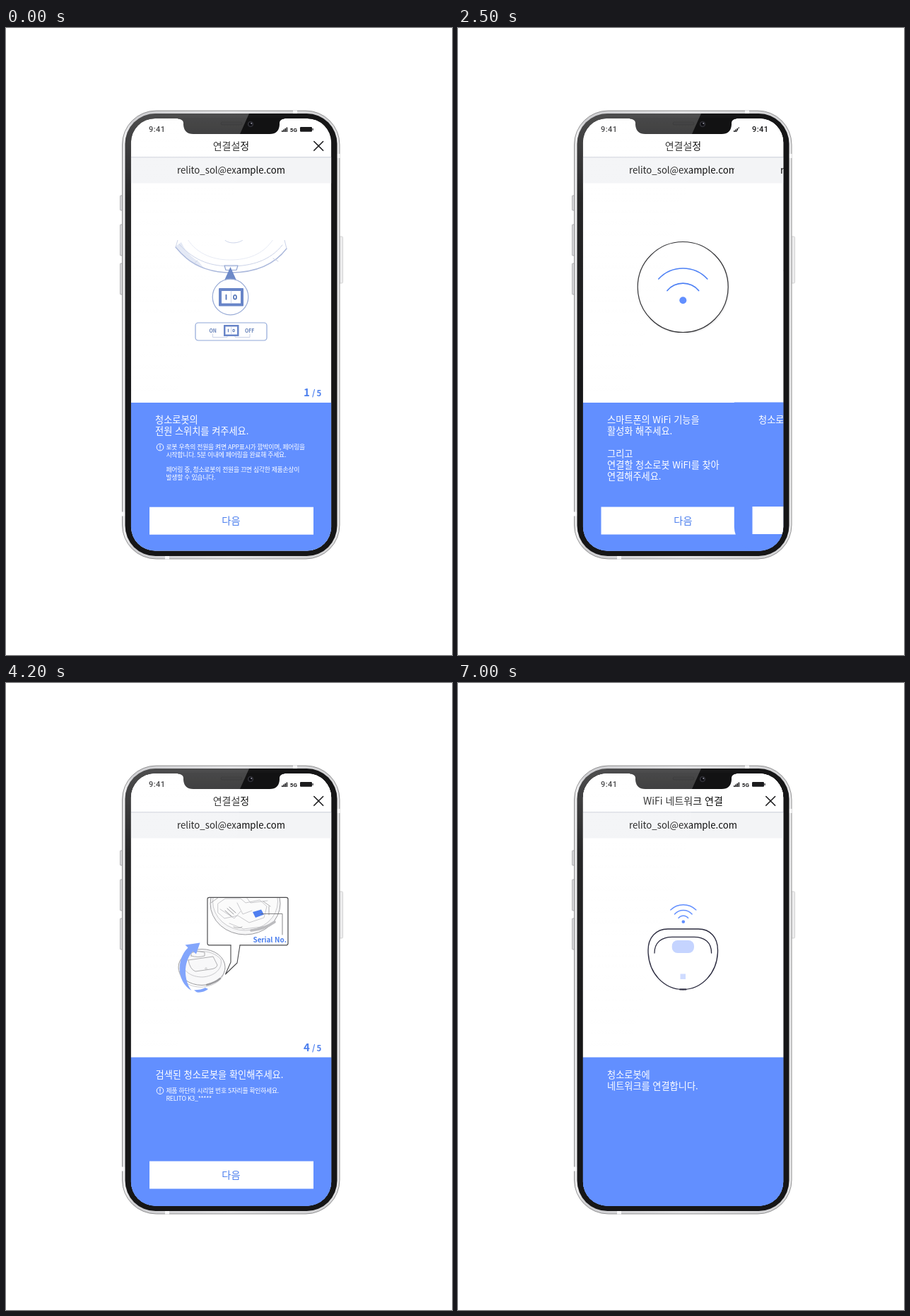
An HTML page for the animation above (8 s loop, 631 by 887 pixels).

```html
<!DOCTYPE html>
<html lang="ko">
<head>
<meta charset="utf-8">
<title>연결설정</title>
<style>
  html, body { margin: 0; width: 100%; height: 100%; overflow: hidden; background: #fff; }
  svg { display: block; width: 631px; height: 887px; }
  text { font-family: "Noto Sans CJK KR", "Noto Sans KR", "Noto Sans", sans-serif; white-space: pre; }
  .ui { font-family: Roboto, sans-serif; }
  .line { fill: none; stroke-linecap: round; stroke-linejoin: round; }
</style>
</head>
<body>
<svg viewBox="0 0 631 887">
  <defs>
    <clipPath id="screen"><rect x="176.8" y="128" width="283.5" height="611.7" rx="34"/></clipPath>
    <clipPath id="bezel"><rect x="168.5" y="121" width="300" height="626" rx="43"/></clipPath>
    <clipPath id="inset"><rect x="286" y="304" width="112" height="66"/></clipPath>
    <clipPath id="below"><rect x="235" y="300" width="166" height="60"/></clipPath>
    <linearGradient id="metal" x2="1" y2="0">
      <stop offset="0" stop-color="#d2d2d4"/><stop offset=".01" stop-color="#f2f2f3"/>
      <stop offset=".05" stop-color="#cdcdd0"/><stop offset=".5" stop-color="#e2e2e4"/>
      <stop offset=".95" stop-color="#d2d2d4"/><stop offset="1" stop-color="#ececed"/>
    </linearGradient>
    <linearGradient id="gloss" x2="0" y2="1">
      <stop offset="0" stop-color="#fff" stop-opacity=".24"/>
      <stop offset=".12" stop-color="#fff" stop-opacity=".17"/>
      <stop offset=".3" stop-color="#fff" stop-opacity=".07"/>
      <stop offset="1" stop-color="#fff" stop-opacity="0"/>
    </linearGradient>
    <linearGradient id="lens" x2="1" y2=".25">
      <stop offset=".5" stop-color="#cddaff"/><stop offset=".62" stop-color="#bccdff"/>
    </linearGradient>
  </defs>

  <g id="body">
    <g fill="#dadadc" stroke="#8a8a8d" stroke-width=".6">
      <rect x="161.5" y="237" width="4" height="21" rx="1"/>
      <rect x="161.5" y="278" width="4" height="44" rx="1"/>
      <rect x="161.5" y="333" width="4" height="44" rx="1"/>
      <rect x="470" y="295" width="6.5" height="66" rx="1.5" fill="#ededee" stroke="#bcbcbe"/>
    </g>
    <rect x="164.5" y="117" width="307.5" height="634" rx="48" fill="url(#metal)" stroke="#88888a" stroke-width=".9"/>
    <g fill="#f8f8f9">
      <rect x="406" y="116.5" width="6" height="5"/><rect x="467.5" y="178" width="5" height="6"/>
      <rect x="164" y="684.5" width="5" height="6"/><rect x="225" y="746" width="6" height="5.5"/>
    </g>
    <rect x="168.5" y="121" width="300" height="626" rx="43" fill="#161617"/>
  </g>

  <g id="pages" clip-path="url(#screen)"></g>

  <path fill="#121213" d="M243 127H394V128.5Q387.5 129 387 134V137Q386 150 373 150H265Q252 150 251 137V134Q250.5 129 243 128.5Z"/>
  <rect x="304" y="133" width="30" height="4" rx="2" fill="#101011" stroke="#070708" stroke-width=".7"/>
  <circle cx="346" cy="136" r="4.3" fill="#2d2d33"/>
  <circle cx="346" cy="136" r="2.4" fill="#08080c"/>
  <circle cx="347.2" cy="135" r="1" fill="#9a9aa6"/>
  <path clip-path="url(#bezel)" fill="url(#gloss)" d="M168 121H344L331 150L329 210L240 521H168Z"/>
</svg>

<script>
const BLUE = '#628fff', INK = '#1b1b1d', KEY = '#4c7fee';
const LOOP = 8000, FIRST = 1100, EVERY = 1400, STEP = 100;
const MAIL = 'relito_sol@example.com';

const attrs = o => Object.entries(o).map(([k, v]) => ` ${k}="${v}"`).join('');
const text = (x, y, size, fill, str, more = {}) =>
  `<text${attrs({ x, y, 'font-size': size, fill, ...more })}>${str}</text>`;
const mid = (y, size, fill, str, more = {}) =>
  text(318.4, y, size, fill, str, { 'text-anchor': 'middle', ...more });
const line = (d, stroke, w = 1, more = {}) =>
  `<path class="line"${attrs({ d, stroke, 'stroke-width': w, ...more })}/>`;
const shape = (d, fill) => `<path${attrs({ d, fill })}/>`;
const rect = (x, y, width, height, fill, more = {}) =>
  `<rect${attrs({ x, y, width, height, fill, ...more })}/>`;
const dot = (cx, cy, r, fill, more = {}) => `<circle${attrs({ cx, cy, r, fill, ...more })}/>`;
const oval = (cx, cy, rx, ry, fill, stroke, more = {}) =>
  `<ellipse${attrs({ cx, cy, rx, ry, fill, stroke, ...more })}/>`;

// Shallow arch of half-width h rising to s above y
const arch = (cx, y, h, s, stroke, w) => {
  const r = (h * h + s * s) / (2 * s);
  return line(`M${cx - h} ${y}A${r} ${r} 0 0 1 ${cx + h} ${y}`, stroke, w);
};

const lines = (rows, x = 211, y = 559.2, size = 13.2, gap = 15.9, more = {}) =>
  rows.map((row, i) => row && text(x, y + i * gap, size, '#fff', row, more)).join('');

const note = (rows, y) =>
  dot(218, y - 3.2, 4.8, 'none', { stroke: '#fff' }) +
  line(`M218 ${y - 6}v3.4m0 2v.2`, '#fff', 1.1) +
  lines(rows, 226.5, y, 8.9, 10.7, { 'letter-spacing': -.29 });

const header = title =>
  rect(176, 128, 285, 612, '#fff') +
  text(202, 147.3, 11, INK, '9:41', { class: 'ui', 'font-weight': 500, 'letter-spacing': .45 }) +
  [0, 1, 2, 3].map(i => rect(390 + i * 2.2, 145 - i * 1.5, 1.6, 2 + i * 1.5, INK)).join('') +
  text(401.8, 146.6, 8, INK, '5G', { class: 'ui', 'font-weight': 700 }) +
  rect(416, 140, 17, 6.8, INK, { rx: 1.2 }) + rect(433.5, 142, 1.2, 2.8, INK) +
  mid(172.3, 14, '#111', title) +
  line('M435.8 160.5l12.8 12.8m0-12.8l-12.8 12.8', INK, 1.6) +
  rect(176, 183, 285, 36.5, '#f3f4f6') + rect(176, 182.2, 285, 1.2, '#cfd3dc') +
  mid(206.3, 13.2, '#0c0c0c', MAIL);

const counter = n =>
  text(421, 521.3, 15, KEY, n, { 'font-weight': 700 }) +
  text(433, 521.3, 11.5, KEY, '/', { 'font-weight': 700 }) +
  text(439.5, 521.3, 11.5, KEY, '5', { 'font-weight': 700 });

const panel = (y = 529.5) => rect(176, y, 285, 740 - y, BLUE);
const button = (label, y = 677, fill = KEY, x = 202.5) =>
  rect(x, y, 232, 39, '#fff') + mid(y + 24.4, 14.2, fill, label);

// Rocker switch: outer box, white face, I and O marks
const rocker = (x, y, w, h) => {
  const k = w / 35;
  return rect(x, y, w, h, '#6885c8', { rx: k }) +
    rect(x + 4 * k, y + 4 * k, w - 8 * k, h - 8 * k, '#fff') +
    line(`M${x + w / 2} ${y + 4 * k}v${h - 8 * k}`, '#b9c6e6', .7) +
    line(`M${x + 10.5 * k} ${y + h / 2 - 3 * k}v${6 * k}`, '#5474b8', 1.8 * k) +
    oval(x + 23 * k, y + h / 2, 2 * k, 3 * k, 'none', '#5474b8', { 'stroke-width': 1.7 * k });
};

function powerArt() {
  const pale = '#cbd3e8';
  return `<g clip-path="url(#below)">` +
    shape('M240 309Q255 333 281 341L273 331Q255 320 248 303Z', '#e3e8f5') +
    line('M240 310C262 338 290 346 318 346C350 346 378 337 397 312', '#a9b7db', 1.3) +
    line('M240 310L243 300M397 312L394 300M245 306C268 331 292 337 318 337C347 337 374 329 391 307', pale) +
    line('M257 299C271 321 296 329 321 328C348 327 366 317 378 299', '#e6eaf4') +
    line('M308 298C312 306 331 306 337 298', pale) + line('M378 326l7 4M266 333l5-4', pale) + `</g>` +
    line('M309 336H328L326 342.5H311Z', '#92a6d4', 1.2, { fill: '#fff' }) +
    shape('M317.5 338L326.5 358H308.5Z', '#6d89c8') +
    dot(317.5, 380.5, 25.3, '#fff', { stroke: '#9caed8', 'stroke-width': 1.3 }) +
    rocker(301, 368, 35, 25.5) +
    rect(268, 417, 101, 25, '#fff', { rx: 4, stroke: '#8fa7d8', 'stroke-width': 1.2 }) +
    line('M292.5 433v4.5H313V436M345 433v4.5H324V436', pale) +
    rocker(308, 420, 21.5, 16) +
    text(287.5, 431, 6.8, '#637fb8', 'ON', { 'font-weight': 700 }) +
    text(338, 431, 6.8, '#637fb8', 'OFF', { 'font-weight': 700 });
}

const wifiArt = () =>
  dot(319, 367.5, 64, 'none', { stroke: '#eeeeef', 'stroke-width': 2.5 }) +
  dot(318.2, 366.5, 64, '#fff', { stroke: '#303033', 'stroke-width': 1.2 }) +
  arch(318.3, 355, 34.5, 15, '#4d80f5', 1.7) + arch(318.3, 371.5, 22.3, 10.3, '#4d80f5', 1.7) +
  dot(318.3, 385.2, 5, BLUE);

const searchArt = () =>
  line('M248.5 343H362A28 28 0 0 1 362 399H327A8.7 8.7 0 0 0 327 416.4H337M344 416.4H386', '#d6d8de', 1.5) +
  dot(248.5, 343, 2.1, '#b9bcc4') + dot(386.8, 416.4, 3.3, KEY) +
  line('M327 359.5L350 382', '#222', 1.5) +
  dot(303.3, 336.3, 32.8, '#fff', { stroke: '#29292c', 'stroke-width': 1.3 }) +
  dot(303.3, 336.3, 28.2, 'url(#lens)') +
  line('M282.5 325A23.8 23.8 0 0 0 301.5 359.5', '#26262a', 1.3);

function serialArt() {
  const g = '#bcbcbf', edge = '#9b9b9e', arrow = '#7fa3fc';
  return oval(277, 402, 33, 25.5, '#f8f8f9', edge) +
    line('M244 404C247 425 263 431 279 430C298 428 309 417 310 404', g, .8) +
    line('M248 392C258 376 291 375 304 391C307 405 294 415 278 416C262 416 249 408 248 392', g, .8) +
    line('M258 392L293 387L299 399Q298 404 289 405L268 408Q260 405 258 392Z', edge, .8) +
    line('M262 386V381Q271 378 281 381V386Q271 389 262 386Z', edge, .8, { fill: '#f0f0f1' }) +
    line('M284 427Q296 424 303 418', edge, 2.4) +
    dot(283, 404, 1.3, 'none', { stroke: g, 'stroke-width': .7 }) +
    shape('M262.5 435C242 424 240 391 257.5 374.5L253.5 370.5L274.5 367.5L269 383.5L264.5 379.5C250.5 394 251 420 262.5 435Z', arrow) +
    shape('M266 434.5Q277 434 282 431L286 433Q279 438.5 270 437.5Z', arrow) +
    rect(285, 303.3, 114, 67.5, '#fff', { rx: 2.5, stroke: '#4a4a4c', 'stroke-width': 1.2 }) +
    `<g clip-path="url(#inset)">` +
    oval(338.5, 312, 49.5, 44, '#f6f6f7', edge) + oval(338.5, 309, 46, 41, '#fbfbfb', g, { 'stroke-width': .8 }) +
    line('M300 312l10-7h22l7 6 20-4 10 9-4 16-21 7-16-10-19 4-9-8zM303 320l20 13 9-10M327 311l8 16 13-5M340 303l6 8 24-3M316 340l20 8 34-4', g, .8) +
    line('M310 322l9 8M313 319l9 8M316 317l9 8', edge) +
    line('M290 311l11-8M322 345q7 3 12 0M364 309l10 7M372 316v12', edge, .8) +
    line('M347 350Q366 348 380 338', g, 3.6) + `</g>` +
    shape('M349 324L361 320.5L365 327.5L353 332Z', '#4f7ff0') +
    line('M361 326.5H391V356', '#6a6a6d', .8) +
    text(349.5, 366.6, 10, KEY, 'Serial No.', { 'font-weight': 700, 'letter-spacing': -.1 }) +
    shape('M318.5 369H330.5V373H318.5Z', '#fff') +
    line('M318 371V395L310.5 412L327 396L331 371', '#4a4a4c', 1.1, { fill: '#fff' });
}

function networks() {
  const names = ['guest–sorin', 'clean–unit1', 'floors–sorin', 'clean–unit2', 'mgr–sorin', 'lab–sorin'];
  return names.map((name, i) => {
    const y = 234.7 + i * 32.15;
    return text(191, y + 4.4, 12.7, '#3a3a3a', name, { class: 'ui' }) +
      rect(412.7, y - 1.2, 9, 7, INK, { rx: 1 }) +
      line(`M414.7 ${y - 1.2}v-1.5a2.5 2.5 0 0 1 5 0v1.5`, INK, 1.1) +
      line(`M417.2 ${y + 1.4}v1.8`, '#fff', 1.2) +
      arch(436.5, y - 1.2, 7, 3.3, INK, 1.3) + arch(436.5, y + 1.8, 4.2, 2, INK, 1.3) +
      dot(436.5, y + 4.6, 1.4, INK) +
      rect(176, y + 15.6, 285, 1, '#dfe0e3');
  }).join('');
}

const robotArt = () =>
  arch(318.8, 321, 18, 7.2, BLUE, 1.4) + arch(318.8, 327, 12.3, 5.5, BLUE, 1.4) +
  arch(318.8, 332.5, 6.8, 3.3, BLUE, 1.4) + dot(318.8, 337.8, 2.3, BLUE) +
  line('M297 348H340C357 348 367.5 360 367.5 378C367.5 411 344 433.5 318.3 433.5C292 433.5 269 411 269 378C269 360 280 348 297 348Z', '#2b2b3f', 1.4) +
  line('M278 382C278 367 288 359.3 303 359.3H334C349 359.3 358.6 367 358.6 382', '#2b2b3f', 1.3) +
  line('M314 433.5h8.5', '#2b2b3f', 2) +
  rect(302.7, 364, 31.3, 18, '#c5d4ff', { rx: 8 }) +
  rect(314.5, 411.5, 7.5, 7.5, '#cfdcff');

const SETUP = '연결설정', NETWORK = 'WiFi 네트워크 연결';
const screens = [
  header(SETUP) + powerArt() + counter(1) + panel(530) +
    lines(['청소로봇의', '전원 스위치를 켜주세요.'], 211, 558.8) +
    note(['로봇 우측의 전원을 켜면 APP표시가 깜박이며, 페어링을', '시작합니다. 5분 이내에 페어링을 완료해 주세요.', '',
      '페어링 중, 청소로봇의 전원을 끄면 심각한 제품손상이', '발생할 수 있습니다.'], 596.3) +
    button('다음', 677.7, KEY, 203),
  header(SETUP) + wifiArt() + counter(2) + panel(530) +
    lines(['스마트폰의 WiFi 기능을', '활성화 해주세요.', '', '그리고', '연결할 청소로봇 WiFI를 찾아', '연결해주세요.']) +
    button('다음', 677.5),
  header(SETUP) + searchArt() + counter(3) + panel() +
    lines(['청소로봇을 검색 중입니다.']) + button('재검색', 677, '#444'),
  header(SETUP) + serialArt() + counter(4) + panel() +
    lines(['검색된 청소로봇을 확인해주세요.'], 211.5, 558.8) +
    note(['제품 하단의 시리얼 번호 5자리를 확인하세요.', 'RELITO K3_*****'], 580) +
    button('다음', 676.5, KEY, 203),
  header(NETWORK) + networks() + panel() +
    lines(['청소로봇에', '연결할 네트워크를 선택해주세요.', '보안이 설정된 2.4GHz WiFi 환경에서만', '연결 가능합니다.'], 210.3, 559) +
    button('재검색', 677, KEY, 202),
  header(NETWORK) + robotArt() + panel() + lines(['청소로봇에', '네트워크를 연결합니다.'])
];

const pages = document.getElementById('pages');
pages.innerHTML = screens.map(s => `<g clip-path="url(#screen)">${s}</g>`).join('');

// Each later page slides over the previous one in four hard steps
[...pages.children].slice(1).forEach((page, i) => {
  const start = FIRST + i * EVERY;
  const key = (time, x) => ({ offset: time / LOOP, transform: `translateX(${x}px)`, easing: 'step-end' });
  const slide = [214, 143, 71, 0].map((x, n) => key(start + n * STEP, x));
  page.animate([key(0, 300), ...slide, key(LOOP, 0)], { duration: LOOP, iterations: Infinity });
});
</script>
</body>
</html>
```
